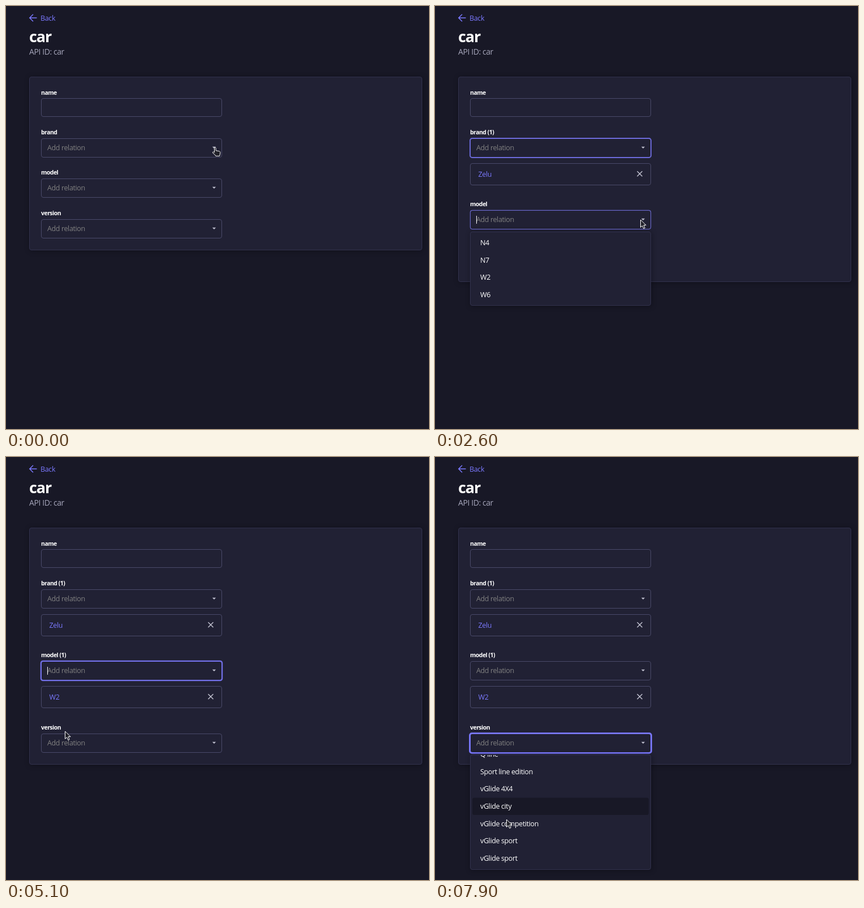
An HTML page for the animation above (8000 ms loop, 748 px wide and 748 px high).

```html
<!DOCTYPE html>
<html lang="en">
<head>
<meta charset="utf-8">
<title>Car form</title>
<style>
html, body { margin: 0; width: 100%; height: 100%; overflow: hidden; background: #181826; }
svg { display: block; }
text { font: 12.5px "Open Sans", "Noto Sans", sans-serif; letter-spacing: -.03em; fill: #fff; white-space: pre; }
.label { font-size: 10.5px; font-weight: 700; letter-spacing: -.05em; }
.title { font-size: 27px; font-weight: 700; letter-spacing: -.04em; }
.sub { font-size: 14px; fill: #a5a5ba; }
.hint { fill: #808080; }
.link { fill: #7b79ff; }
.panel { fill: #212134; stroke: #32324d; }
.box { fill: #212134; stroke: #4a4a6a; }
.shadow { filter: drop-shadow(1px 1px 5px rgba(3, 3, 5, .35)); }
.ring { fill: none; stroke: #7b79ff; }
.line { fill: none; stroke: #7b79ff; stroke-width: 1.5; }
.cross { fill: none; stroke: #c0c0cf; stroke-width: 1.5; }
.pointer { fill: #22222a; stroke: #fff; stroke-width: 1; stroke-linejoin: round; }
</style>
</head>
<body>
<script>
const LOOP = 8000, STEP = 100;
const LEFT = 62, WIDTH = 320;
const FIRST = 234, GAP = 71.4, SHIFT = 55.9;   // field spacing, and the room a chip takes
const ROW = 30.6, PAD = 4.2, MAX_LIST = 204;
const BLINK = 600, FADE = 200;
const SCROLL_AT = 7600, SCROLL_TIME = 300, SCROLL_BY = 50.2;

const clamp = v => Math.min(1, Math.max(0, v));
const ease = k => k * k * (3 - 2 * k);

function set(node, attrs) {
  for (const key in attrs) node.setAttribute(key, attrs[key]);
}
function add(parent, tag, attrs = {}, text) {
  const node = document.createElementNS('http://www.w3.org/2000/svg', tag);
  set(node, attrs);
  if (text) node.textContent = text;
  parent.append(node);
  return node;
}
const show = (node, on) => set(node, { display: on ? 'inline' : 'none' });
const moveTo = (node, x, y) => set(node, { transform: `translate(${x} ${y})` });
const write = (parent, x, y, text, cls = '') => add(parent, 'text', { x, y, class: cls }, text);
const rect = (parent, x, y, width, height, cls) =>
  add(parent, 'rect', { x: x + .5, y: y + .5, width: width - 1, height: height - 1, rx: 3.5, class: cls });

// Times at which each list opens, an item is chosen and the field loses focus.
const fields = [
  { name: 'brand', open: 300, chosen: 1500, blur: 2500, pick: 'Zelu', items: ['Zelu', 'KVO'] },
  { name: 'model', open: 2600, chosen: 5000, blur: 6700, pick: 'W2', items: ['N4', 'N7', 'W2', 'W6'] },
  {
    name: 'version', open: 6800, chosen: LOOP, blur: LOOP,
    items: ['Business edition', 'Q line', 'Sport line edition', 'vGlide 4X4', 'vGlide city',
            'vGlide competition', 'vGlide sport', 'vGlide sport']
  }
];

// Stops of the pointer: time, x, y.
const stops = [
  [600, 369, 250], [1000, 292, 304], [1200, 278, 289], [1600, 278, 289],
  [2500, 363, 378], [2700, 363, 378], [3200, 112, 464], [3600, 96, 434], [3800, 96, 434],
  [4300, 100, 494], [4700, 101, 484], [5100, 104, 485], [5600, 230, 560], [6200, 381, 512],
  [6500, 370, 508], [6800, 370, 508], [7500, 128, 656], [7600, 128, 656], [7900, 126, 641]
];

function pointerAt(t) {
  const next = stops.findIndex(stop => stop[0] > t);
  if (next < 0) return stops[stops.length - 1].slice(1);
  const b = stops[next], a = stops[next - 1] || b;
  const k = a === b ? 0 : ease((t - a[0]) / (b[0] - a[0]));
  return [a[1] + (b[1] - a[1]) * k, a[2] + (b[2] - a[2]) * k];
}

const stage = add(document.body, 'svg', { width: '100%', height: '100%', viewBox: '0 0 748 748' });

add(stage, 'path', { d: 'M54.5 21H42M48 14.8L41.8 21L48 27.2', class: 'line' });
write(stage, 61, 25.5, 'Back', 'link');
write(stage, 41, 64, 'car', 'title');
write(stage, 41, 86, 'API ID: car', 'sub');

const panel = rect(stage, 41, 125, 695, 307, 'panel shadow');
write(stage, LEFT, 156.5, 'name', 'label');
rect(stage, LEFT, 163, WIDTH, 33, 'box');

function buildField(f) {
  f.group = add(stage, 'g');
  f.label = write(f.group, LEFT, -7, f.name, 'label');
  rect(f.group, LEFT, 0, WIDTH, 34, 'box');
  f.ring = rect(f.group, LEFT, 0, WIDTH, 34, 'ring');
  write(f.group, 73, 21, 'Add relation', 'hint');
  f.caret = add(f.group, 'rect', { x: 73, y: 10, width: 1, height: 14, fill: '#fff' });
  add(f.group, 'path', { d: 'M364.8 14.8h6.4l-3.2 3.2z', fill: '#c0c0cf' });
  f.chip = add(f.group, 'g');
  if (f.pick) {
    rect(f.chip, LEFT, 44, WIDTH, 39, 'box');
    write(f.chip, 76.5, 67.7, f.pick, 'link');
    add(f.chip, 'path', { d: 'M357.5 58.3l9 9m0-9l-9 9', class: 'cross' });
  }
}

function buildList(f) {
  const height = Math.min(MAX_LIST, Math.round(f.items.length * ROW + 2 * PAD));
  f.list = add(stage, 'g');
  rect(f.list, LEFT, 0, WIDTH, height, 'panel shadow');
  const view = add(f.list, 'svg', { x: LEFT, y: 1, width: WIDTH, height: height - 2, overflow: 'hidden' });
  f.rows = add(view, 'g');
  f.mark = add(f.rows, 'rect', { x: 4, width: WIDTH - 8, height: ROW, rx: 3.5, fill: '#181826' });
  f.items.forEach((item, i) => write(f.rows, 18, PAD - 1 + ROW * (i + .5) + 4.4, item));
}

fields.forEach(buildField);
fields.forEach(buildList);

const arrow = add(stage, 'path', {
  d: 'M0 0V13.4L3.1 10.6L5.4 15.6L7.7 14.5L5.5 9.6H9.6Z', class: 'pointer'
});
const hand = add(stage, 'path', {
  d: 'M4 9.4V2a1.3 1.3 0 0 1 2.6 0V6.2L12 7.2c1.9.4 2.5 1.1 2.3 2.9L13.8 13l-.8 2.8H6.4L5 13.6L1 10.2' +
     'c-.7-1.2.7-2.3 2-1.3Z',
  class: 'pointer'
});

// Focus grows on opening, dips when an item is chosen and fades on blur.
function focusPower(f, t) {
  if (t < f.open) return 0;
  const grown = t < f.chosen
    ? clamp((t - f.open + 20) / FADE)
    : .4 + .6 * clamp((t - f.chosen) / FADE);
  return grown * (1 - clamp((t - f.blur) / FADE));
}

function drawField(f, y, t) {
  const chosen = t >= f.chosen;
  moveTo(f.group, 0, Math.round(y));
  f.label.textContent = f.name + (chosen ? ' (1)' : '');
  show(f.chip, chosen);

  const since = t - (chosen ? f.chosen : f.open);
  show(f.caret, since >= 0 && t < f.blur && since % (2 * BLINK) < BLINK);

  const power = focusPower(f, t), grow = .9 * power;
  show(f.ring, power > 0);
  set(f.ring, {
    x: LEFT + .5 - grow, y: .5 - grow,
    width: WIDTH - 1 + 2 * grow, height: 33 + 2 * grow,
    'stroke-width': 1 + 2 * grow, opacity: .6 + .4 * power
  });
}

function drawList(f, y, t) {
  const open = t >= f.open && t < f.chosen;
  show(f.list, open);
  if (!open) return;
  const top = Math.round(y + 37.6);
  moveTo(f.list, 0, top);

  // The marked row stays with its item while the list scrolls.
  const pointerY = pointerAt(Math.min(t, SCROLL_AT))[1];
  const active = Math.floor((pointerY - top - PAD) / ROW);
  show(f.mark, active >= 0);
  set(f.mark, { y: PAD - 1 + ROW * active });
  moveTo(f.rows, 0, -SCROLL_BY * ease(clamp((t - SCROLL_AT) / SCROLL_TIME)));
}

function draw(t) {
  let push = 0;
  fields.forEach((f, i) => {
    const y = FIRST + GAP * i + push;
    drawField(f, y, t);
    drawList(f, y, t);
    if (t >= f.chosen) push += SHIFT;
  });
  set(panel, { height: 306 + Math.round(push) });

  const [x, y] = pointerAt(t), resting = t <= stops[0][0];
  show(hand, resting);
  show(arrow, !resting);
  moveTo(hand, x - 4.5, y - .5);
  moveTo(arrow, x + .5, y);
}

function tick() {
  draw(Math.floor(performance.now() % LOOP / STEP) * STEP);
  requestAnimationFrame(tick);
}
tick();
</script>
</body>
</html>
```
